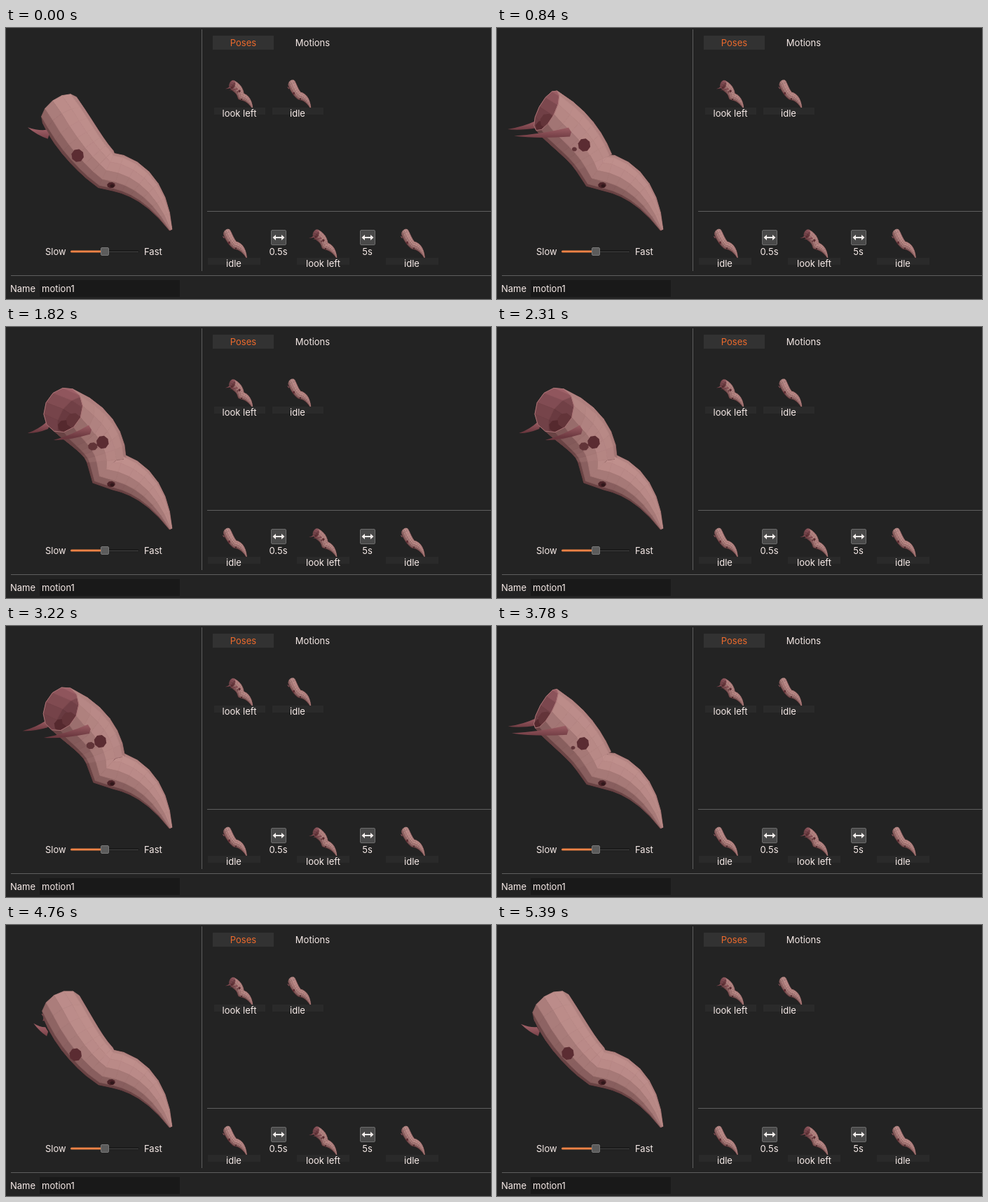
An HTML page with a canvas that plays this animation: 692 by 388 pixels, repeating every 5.46 s.

```html
<!DOCTYPE html>
<html lang="en">
<head>
<meta charset="utf-8">
<title>Pose editor</title>
<style>
  html, body { margin: 0; width: 100%; height: 100%; overflow: hidden; background: #232323; }
  canvas, svg { position: absolute; left: 0; top: 0; width: 692px; height: 388px; }
  text { font: 13px Inter, Roboto, sans-serif; fill: #f7ebe8; }
  .mid { text-anchor: middle; }
  .rule { stroke: #5e5e5e; fill: none; }
  .band { fill: #2a2a2a; }
</style>
</head>
<body>
<canvas id="stage" width="692" height="388"></canvas>
<svg viewBox="0 0 692 388">
  <defs>
    <g id="swap">
      <rect x=".5" y=".5" width="21" height="21" rx="1.5" fill="#494949" stroke="#6c6c6c"/>
      <path d="M2.5 11 7 7V10H15V7L19.500 11 15 15V12H7V15Z" fill="#f4efed"/>
    </g>
  </defs>

  <path class="rule" d="M279.5 2V348M287 262.5H692M7 354.5H692"/>

  <rect x="295" y="11" width="87" height="20" fill="#323232"/>
  <text class="mid" x="338.5" y="26" style="fill:#ed6a2c">Poses</text>
  <text class="mid" x="437.5" y="26">Motions</text>

  <rect class="band" x="297" y="114" width="73" height="10"/>
  <rect class="band" x="380" y="114" width="73" height="10"/>
  <text class="mid" x="333" y="127">look left</text>
  <text class="mid" x="416" y="127">idle</text>

  <rect class="band" x="288" y="329" width="75" height="10"/>
  <rect class="band" x="415" y="329" width="75" height="10"/>
  <rect class="band" x="542" y="329" width="75" height="10"/>
  <text class="mid" x="325" y="342">idle</text>
  <text class="mid" x="452.5" y="342">look left</text>
  <text class="mid" x="579" y="342">idle</text>
  <use href="#swap" x="378" y="289"/>
  <use href="#swap" x="505" y="289"/>
  <text class="mid" x="388.5" y="325">0.5s</text>
  <text class="mid" x="515.5" y="325">5s</text>

  <text x="56" y="325">Slow</text>
  <text x="197" y="325">Fast</text>
  <rect x="92" y="318.5" width="98" height="3" rx="1.5" fill="#181818"/>
  <path d="M146 320.500H189" stroke="#444"/>
  <rect x="92" y="318.5" width="46" height="3" rx="1.5" fill="#ee8347"/>
  <rect x="135.5" y="314.5" width="11" height="11" rx="1.500" fill="#5c5c5c" stroke="#777"/>

  <rect x="48" y="361" width="200" height="24" fill="#191919"/>
  <text x="6" y="378">Name</text>
  <text x="51" y="378">motion1</text>
</svg>
<script>
const ctx = document.getElementById('stage').getContext('2d');
const LOOP = 5460, STEP = 70, PEAK = 2275;
const SIDES = 12, RINGS = 7;
const NECK = [143, 204];
const LIGHT = [0.3, -0.55, 0.78];

const mix = (a, b, k) => a + (b - a) * k;
const mixAll = (a, b, k) => a.map((v, i) => mix(v, b[i], k));
const clamp = v => Math.min(1, Math.max(0, v));
const rgb = c => `rgb(${c.map(Math.round)})`;
const bezier = (a, b, c, t) => mixAll(mixAll(a, b, t), mixAll(b, c, t), t);

// Rings along the spine, tail tip first, mouth rim last.
// turn goes from 0 (idle) to 1 (looking left).
function spine(turn) {
  const rings = [];
  for (let i = RINGS; i >= 0; i--) {
    const t = i / RINGS;
    const [x, y] = bezier(NECK, [205, 212], [235, 289], t);
    rings.push({ x, y, z: 0, r: 2 + 25 * (1 - t * t), tilt: 0, inner: 0 });
  }
  const bend = mixAll([108, 178], [150, 158], turn);
  const rim = mixAll([80, 117], [82, 119], turn);
  const tilt = mix(-0.75, 0.96, turn);
  for (let i = 1; i <= RINGS; i++) {
    const t = i / RINGS;
    const [x, y] = bezier(NECK, bend, rim, t);
    rings.push({
      x: x - 12 * t * Math.sin(Math.PI * turn),
      y,
      z: 45 * t * t * Math.sin(tilt * t),
      r: 27 + (4 + 4 * turn) * Math.sin(2.3 * t ** 1.5),
      tilt: tilt * t * t,
      inner: clamp((t - 0.5) * 2)
    });
  }
  rings.forEach((ring, i) => {
    const a = rings[Math.max(0, i - 1)], b = rings[i + 1] || ring;
    ring.heading = Math.atan2(b.y - a.y, b.x - a.x);
  });
  rings.at(-1).heading = -2.1 - 0.63 * turn * (2 - turn);
  return rings;
}

// Unit vector from a ring's centre towards its side number s.
function radial({ heading, tilt }, s) {
  const a = s / SIDES * Math.PI * 2;
  const c = Math.cos(a), d = Math.sin(a);
  const ch = Math.cos(heading), sh = Math.sin(heading);
  return [
    -c * sh - d * Math.sin(tilt) * ch,
    c * ch - d * Math.sin(tilt) * sh,
    d * Math.cos(tilt)
  ];
}

function vertex(ring, s) {
  const n = radial(ring, s);
  return [ring.x + ring.r * n[0], ring.y + ring.r * n[1], ring.z + ring.r * n[2]];
}

function shape(points) {
  const path = new Path2D();
  points.forEach(([x, y]) => path.lineTo(x, y));
  path.closePath();
  return path;
}

function fill(path, color) {
  ctx.fillStyle = color;
  ctx.fill(path);
}

function area(points) {
  return points.reduce((sum, [x, y], i) => {
    const [u, v] = points[(i + 1) % points.length];
    return sum + x * v - u * y;
  }, 0);
}

function skin(rings) {
  const faces = [];
  for (let i = 0; i < rings.length - 1; i++) {
    const a = rings[i], b = rings[i + 1];
    for (let s = 0; s < SIDES; s++) {
      const points = [vertex(a, s), vertex(a, s + 1), vertex(b, s + 1), vertex(b, s)];
      const n = radial(a, s + 0.5);
      const lit = n.reduce((sum, v, k) => sum + v * LIGHT[k], 0);
      const color = area(points) > 0
        ? mixAll([105, 67, 68], [191, 143, 140], clamp(0.28 + 0.72 * lit))
        : mixAll([77, 39, 44], [164, 100, 108], b.inner * clamp(0.75 + 0.4 * lit));
      faces.push({ points, color: rgb(color), depth: points.reduce((z, p) => z + p[2], 0) });
    }
  }
  faces.sort((a, b) => a.depth - b.depth);
  ctx.lineWidth = 0.8;
  for (const { points, color } of faces) {
    const path = shape(points);
    fill(path, color);
    ctx.strokeStyle = color;
    ctx.stroke(path);
  }
}

function blob(x, y, rx, ry, color) {
  const points = [];
  for (let a = 0.25; a < 6.4; a += Math.PI / 4) {
    points.push([x + rx * Math.cos(a), y + ry * Math.sin(a)]);
  }
  fill(shape(points), color);
}

function mouth(rim, turn) {
  if (rim.tilt <= 0) return;
  const opening = shape(Array.from({ length: SIDES }, (_, s) => vertex(rim, s)));
  const shift = 40 * (1 - turn);
  ctx.save();
  ctx.clip(opening);
  blob(rim.x + 2 - shift * 0.6, rim.y + 23, 10, 9, '#55292e');
  blob(rim.x + 15 - shift, rim.y + 15, 11, 11, '#633439');
  ctx.restore();
  ctx.lineWidth = 1;
  ctx.strokeStyle = '#ab7476';
  ctx.stroke(opening);
}

// The tip swings on an arc that reaches furthest left when turn equals phase.
function tusk(turn, phase, tipY, baseX, baseY, half) {
  const x = 15 + 160 * (turn - phase) ** 2;
  const path = new Path2D();
  path.moveTo(x, tipY);
  path.quadraticCurveTo(mix(x, baseX, 0.5), mix(tipY, baseY, 0.5), baseX - 4, baseY - half);
  path.lineTo(baseX, baseY);
  path.lineTo(baseX - 2, baseY + half);
  path.quadraticCurveTo(mix(x, baseX, 0.4), mix(tipY, baseY, 0.4) + half, x, tipY);
  const g = ctx.createLinearGradient(0, baseY - half, 0, baseY + half + 4);
  g.addColorStop(0, '#9c5d64');
  g.addColorStop(1, '#6b383f');
  fill(path, g);
}

function worm(turn) {
  const rings = spine(turn);
  tusk(turn, 0.68, 131 + 21 * turn, 54 + 8 * turn, 132 + 9 * turn, 5);
  skin(rings);
  mouth(rings.at(-1), turn);

  const x = 98 + 40 * turn, y = 165 + 22 * (1 - turn) ** 2;
  const fold = clamp((turn - 0.3) / 0.7);
  blob(x - 14, y + 6, 7 * fold, 6 * fold, '#613438');
  blob(x, y, 9, 9.5, '#5b2c32');
  blob(150, 225, 6, 4.5, '#4a2328');
  blob(151.5, 226, 3, 2.5, '#30171a');

  const swing = 91 - 31 * Math.cos(Math.PI * turn);
  tusk(turn, 0.42, 140 + 22 * turn, swing, 153 - 6 * turn, 6.5);
}

// A small worm whose tail tip stands at x, y.
function thumb(turn, x, y, sx, sy) {
  ctx.save();
  ctx.translate(x, y);
  ctx.scale(sx, sy);
  ctx.translate(-237, -290);
  worm(turn);
  ctx.restore();
}

function draw(time) {
  const t = Math.floor(time % LOOP / STEP) * STEP;
  const wave = (1 + Math.cos((t - PEAK) / LOOP * Math.PI * 2)) / 2;
  ctx.clearRect(0, 0, 692, 388);
  worm(Math.sin(wave * Math.PI / 2));
  thumb(0.9, 352, 115, 0.183, 0.198);
  thumb(0, 435, 115, 0.175, 0.208);
  thumb(0, 343.5, 329, 0.18, 0.21);
  thumb(0.9, 472, 329, 0.186, 0.2);
  thumb(0, 597.5, 329, 0.18, 0.21);
}

let start;
function tick(now) {
  start ??= now;
  draw(now - start);
  requestAnimationFrame(tick);
}
draw(0);
requestAnimationFrame(tick);
</script>
</body>
</html>
```
